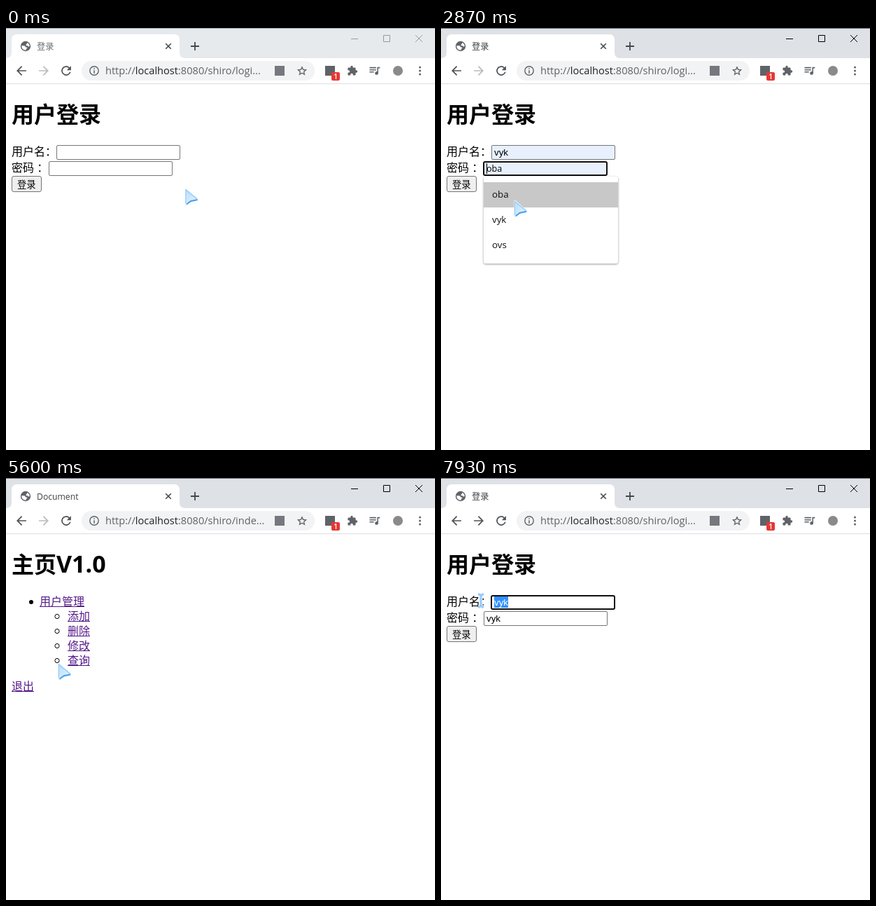
Write an HTML page that moves like this. It is 613 px wide and 602 px high and loops after 8 s.

```html
<!DOCTYPE html>
<html lang="zh-CN">
<head>
<meta charset="utf-8">
<title>登录</title>
<style>
html, body { margin: 0; width: 100%; height: 100%; overflow: hidden; background: #fff; }
svg { display: block; font-family: "Open Sans", "Noto Sans CJK SC", "Noto Sans CJK", sans-serif; }
text { white-space: pre; }
.field { font-family: "Liberation Sans", Arial, sans-serif; }
.popup { filter: drop-shadow(0 1px 1.5px rgba(0, 0, 0, .4)); }
</style>
</head>
<body>
<svg width="613" height="602" viewBox="0 0 613 602">
  <defs>
    <linearGradient id="ice" x1="0" y1="0" x2=".7" y2="1">
      <stop offset="0" stop-color="#b4dcfb"/><stop offset="1" stop-color="#e2f2ff"/>
    </linearGradient>
  </defs>
  <g id="view"></g>
</svg>
<script>
const LOOP = 8000, STEP = 1000 / 15;
const GREY = '#5f6368', FILLED = '#e8f0fe', LINK = '#551a8b';
const USER = 'vyk';
const nameItems = ['oba', USER, '10050070030', '7400186315', 'luomei47', '1005007@example.com'];
const passItems = ['oba', USER, 'ovs'];

// Cursor path: time, x, y
const path = [
  [0, 256, 230], [70, 256, 230], [530, 67, 173], [870, 110, 179], [1130, 110, 179],
  [1330, 120, 204], [1730, 106, 243], [1870, 106, 243], [2200, 106, 198], [2600, 106, 201],
  [2730, 106, 201], [2930, 104, 268], [3070, 104, 268], [3530, 37, 218], [4400, 37, 218],
  [4600, 70, 170], [4930, 64, 192], [5200, 54, 182], [5530, 60, 262], [5750, 106, 272],
  [5900, 104, 205], [6070, 66, 182], [6130, 66, 182], [6330, 79, 140], [6730, 29, 62],
  [7000, 29, 62], [7330, 90, 178], [7470, 110, 178], [7650, 110, 178], [7930, 57, 175], [8000, 57, 175]
];
const beamTimes = [[330, 1190], [2130, 2790], [7300, 8000]];

const shapes = {
  back: 'M20 11H7.8l5.6-5.6L12 4l-8 8 8 8 1.4-1.4L7.8 13H20z',
  reload: 'M17.65 6.35A8 8 0 1 0 19.73 14h-2.08A6 6 0 1 1 16.22 7.78L13 11h7V4z',
  globe: 'M12 2a10 10 0 1 0 0 20 10 10 0 0 0 0-20zM4 11h5q3 0 3 3h3q1 3-2 3v3Q4 20 4 11zM15 4.6Q20 7 20 12l-2 1-2-2h-3V8q2 0 2-2z',
  puzzle: 'M20.5 11H19V7c0-1.1-.9-2-2-2h-4V3.5a2.5 2.5 0 0 0-5 0V5H4c-1.1 0-2 .9-2 2v3.8h1.5a2.7 2.7 0 0 1 0 5.4H2V20c0 1.1.9 2 2 2h3.8v-1.5a2.7 2.7 0 0 1 5.4 0V22H17c1.1 0 2-.9 2-2v-4h1.5a2.5 2.5 0 0 0 0-5z',
  queue: 'M15 6H3v2h12zm0 4H3v2h12zM3 16h8v-2H3zM17 6v8.18A3 3 0 1 0 19 17V8h3V6z',
  star: 'M12 2.5l2.9 6.4 7 .7-5.3 4.7 1.6 6.9-6.2-3.6-6.2 3.6 1.6-6.9L2.1 9.6l7-.7zM12 7l-1.6 3.7-4 .4 3 2.7-.9 3.9 3.5-2.1 3.5 2.1-.9-3.9 3-2.7-4-.4z'
};

const text = (x, y, size, str, attrs = '') => `<text x="${x}" y="${y}" font-size="${size}" ${attrs}>${str}</text>`;
const heading = str => text(8, 135, 32, str, 'font-weight="700"');
const rect = (x, y, w, h, fill, attrs = '') => `<rect x="${x}" y="${y}" width="${w}" height="${h}" fill="${fill}" ${attrs}/>`;
const circle = (x, y, r, fill, attrs = '') => `<circle cx="${x}" cy="${y}" r="${r}" fill="${fill}" ${attrs}/>`;
const line = (d, color, width) => `<path d="${d}" fill="none" stroke="${color}" stroke-width="${width}"/>`;
const cross = (x, y, r, color, width) =>
  line(`M${x - r} ${y - r}l${2 * r} ${2 * r}m0 ${-2 * r}l${-2 * r} ${2 * r}`, color, width);
const icon = (name, x, y, scale, color = GREY, turn = 0) =>
  `<path transform="translate(${x} ${y}) rotate(${turn}) scale(${scale}) translate(-12 -12)" d="${shapes[name]}" fill="${color}" fill-rule="evenodd"/>`;
const link = (x, y, str) => text(x, y, 16, str, `fill="${LINK}"`) + rect(x, y + 1, str.length * 16, 1, LINK);
const within = (t, a, b) => t >= a && t < b;

function cursorAt(t) {
  const i = Math.max(1, path.findIndex(p => p[0] >= t));
  const [t0, x0, y0] = path[i - 1], [t1, x1, y1] = path[i];
  const k = (t - t0) / (t1 - t0);
  return { x: x0 + (x1 - x0) * k, y: y0 + (y1 - y0) * k };
}

function browser(t, home) {
  const active = t >= 1000, loading = within(t, 3600, 4060);
  const button = active ? '#000' : '#999';
  const spinner = t < 3720 ? '' :
    `<g transform="rotate(${-t * .6 % 360} 28 26)">${line('M28 19.5a6.5 6.5 0 0 1 6.5 6.5', GREY, 1.8)}</g>`;
  return rect(0, 0, 613, 43, active ? '#dee1e6' : '#e7eaed') +
    rect(0, 0, 613, 1, active ? '#63666a' : '#a5a8ab') +
    '<path d="M0 43q8 0 8-8V17q0-8 8-8H240q8 0 8 8V35q0 8 8 8z" fill="#fff"/>' +
    (loading ? spinner : icon('globe', 28, 26, .72)) +
    text(44, 31, 12.2, home ? 'Document' : '登录', `fill="${active ? '#3c4043' : '#6a6d71'}"`) +
    cross(232, 26, 3.8, '#45494d', 1.6) + line('M264 26h12m-6-6v12', '#45494d', 1.8) +
    line('M493 15.5h10M539.5 10.5h9v9h-9z', button, 1) + cross(590, 15, 5, button, 1) +
    rect(0, 43, 613, 36, '#fff') + rect(0, 79, 613, 1, '#dcdee2') +
    icon('back', 22, 61, .87, '#505458') +
    icon('back', 54, 61, .87, t >= 6860 ? '#505458' : '#babcbe', 180) +
    (loading ? cross(86, 61, 5.3, '#505458', 1.8) : icon('reload', 86, 61, .86, '#505458')) +
    rect(108, 47, 333, 28, '#f1f3f4', 'rx="14"') +
    circle(126, 61, 6.2, 'none', `stroke="${GREY}" stroke-width="1.4"`) +
    line('M126 57.2v1.6m0 1.4v4.6', GREY, 1.5) +
    text(142, 66, 14.6, `http://<tspan fill="#202124">localhost</tspan>:8080/shiro/${home ? 'inde' : 'logi'}...`, `fill="${GREY}"`) +
    rect(384, 54, 14, 14, '#75797d') + icon('star', 423, 61, .72) +
    rect(456, 54, 14, 14, GREY) + rect(465, 63, 12, 12, '#e53935', 'rx="2"') +
    text(471, 73, 10, '1', 'fill="#fff" font-weight="600" text-anchor="middle"') +
    icon('puzzle', 495, 61, .66) + icon('queue', 526.5, 60.5, .78) + circle(560, 61, 7, '#8a8a8a') +
    [56, 61, 66].map(y => circle(591.5, y, 1.5, GREY)).join('');
}

const input = (x, y, fill, focused) => focused
  ? rect(x, y + 1, 176, 19, fill, 'stroke="#101010" stroke-width="2" rx="2"')
  : rect(x + .5, y + .5, 176, 20, fill, 'stroke="#767676" rx="1.5"');
const caret = (x, y) => rect(x, y, 1, 15, '#000');
const value = (x, y, str, preview) => text(x, y, preview ? 12.6 : 13.33, str, preview ? '' : 'class="field"');

function popup(x, y, items, row) {
  return `<g class="popup">${rect(x, y, 192, items.length * 36 + 16, '#fff', 'rx="3"')}</g>` +
    (items[row] ? rect(x, y + 8 + row * 36, 192, 36, '#c8c8c8') : '') +
    items.map((s, i) => text(x + 12, y + 30 + i * 36, 13.3, s, 'fill="#111"')).join('');
}

function loginPage(t, cur) {
  const back = t >= 6860;
  const nameOpen = within(t, 1130, 1860), passOpen = within(t, 2730, 3060);
  const nameRow = Math.floor((cur.y - 197) / 36), passRow = Math.floor((cur.y - 220) / 36);
  const nameFocus = within(t, 1000, 2460) || t >= 7390;
  const passFocus = within(t, 2460, 3590);
  const name = nameOpen ? nameItems[nameRow] || '' : t > 1800 ? USER : '';
  const pass = passOpen ? passItems[passRow] || '' : t > 3000 ? USER : '';
  const hover = within(t, 3450, 3900);
  const fill = s => s && !back ? FILLED : '#fff';
  const picked = t > 7650 ? Math.max(0, Math.min(3, Math.round((96 - cur.x) / 6.67))) : 0;
  const start = 96 - picked * 6.67;

  let out = heading('用户登录') + text(8, 182, 16, '用户名：') + text(8, 205, 16, '密码 ：') +
    input(72, 167, fill(name), nameFocus) + input(61, 190, fill(pass), passFocus) +
    value(76, 182, name, nameOpen) + value(65, 205, pass, passOpen);
  if (picked) out += rect(start, 169, 96 - start, 16, '#3390ff') +
    text(start, 182, 13.33, USER.slice(3 - picked), 'class="field" fill="#fff"');
  else if (nameFocus) out += caret(name && !nameOpen ? 96 : 76, 170);
  if (passFocus) out += caret(pass && !passOpen ? 85 : 65, 193);
  out += rect(8.5, 211.5, 42, 22, hover ? '#e3e3e3' : '#efefef', `stroke="${hover ? '#4f4f4f' : '#767676'}" rx="2.5"`) +
    text(16, 228, 13.33, '登录');
  if (nameOpen) out += popup(72, 189, nameItems, nameRow);
  if (passOpen) out += popup(61, 212, passItems, passRow);
  return out;
}

function homePage() {
  return heading('主页<tspan font-size="34">V1.0</tspan>') +
    circle(36, 177, 3, '#000') + link(48, 182, '用户管理') +
    ['添加', '删除', '修改', '查询'].map((s, i) =>
      circle(73, 197.5 + i * 21, 3.1, 'none', 'stroke="#000"') + link(88, 203 + i * 21, s)).join('') +
    link(8, 303, '退出');
}

function statusBubble() {
  return '<path d="M0 602V580.5H195q4 0 4 4V602z" fill="#f1f3f4" stroke="#c6c9cd"/>' +
    text(6, 596, 12, '正在等待 localhost 的响应...', `fill="${GREY}"`);
}

function pointer(t, { x, y }) {
  const beam = 'M-4-9q4 0 4 3V6q0 3-4 3M4-9q-4 0-4 3V6q0 3 4 3';
  const isBeam = beamTimes.some(([a, b]) => within(t, a, b));
  const shape = isBeam
    ? line(beam, '#d3eaff', 5) + line(beam, '#8cc4f5', 1.8)
    : '<path d="M0 0V22L7 17.5 17 15z" fill="url(#ice)" stroke="#e2f1fe" stroke-width="2.5" stroke-linejoin="round"/>' +
      line('M0 20V1L16 14', '#8cc6f6', 1.2) + line('M1 21.5L7 17 16.5 15', '#4a9fe8', 2);
  return `<g transform="translate(${(isBeam ? x : x + 1).toFixed(1)} ${y.toFixed(1)})">${shape}</g>`;
}

const view = document.getElementById('view');
let shown = -1;
function frame(now) {
  const step = Math.floor((now % LOOP + 5) / STEP) % (LOOP / STEP);
  if (step !== shown) {
    shown = step;
    const t = step * STEP, cur = cursorAt(t), home = within(t, 3860, 6860);
    view.innerHTML = browser(t, home) + (home ? homePage() : loginPage(t, cur)) +
      (within(t, 3790, 4460) ? statusBubble() : '') + pointer(t, cur);
  }
  requestAnimationFrame(frame);
}
frame(performance.now());
</script>
</body>
</html>
```
